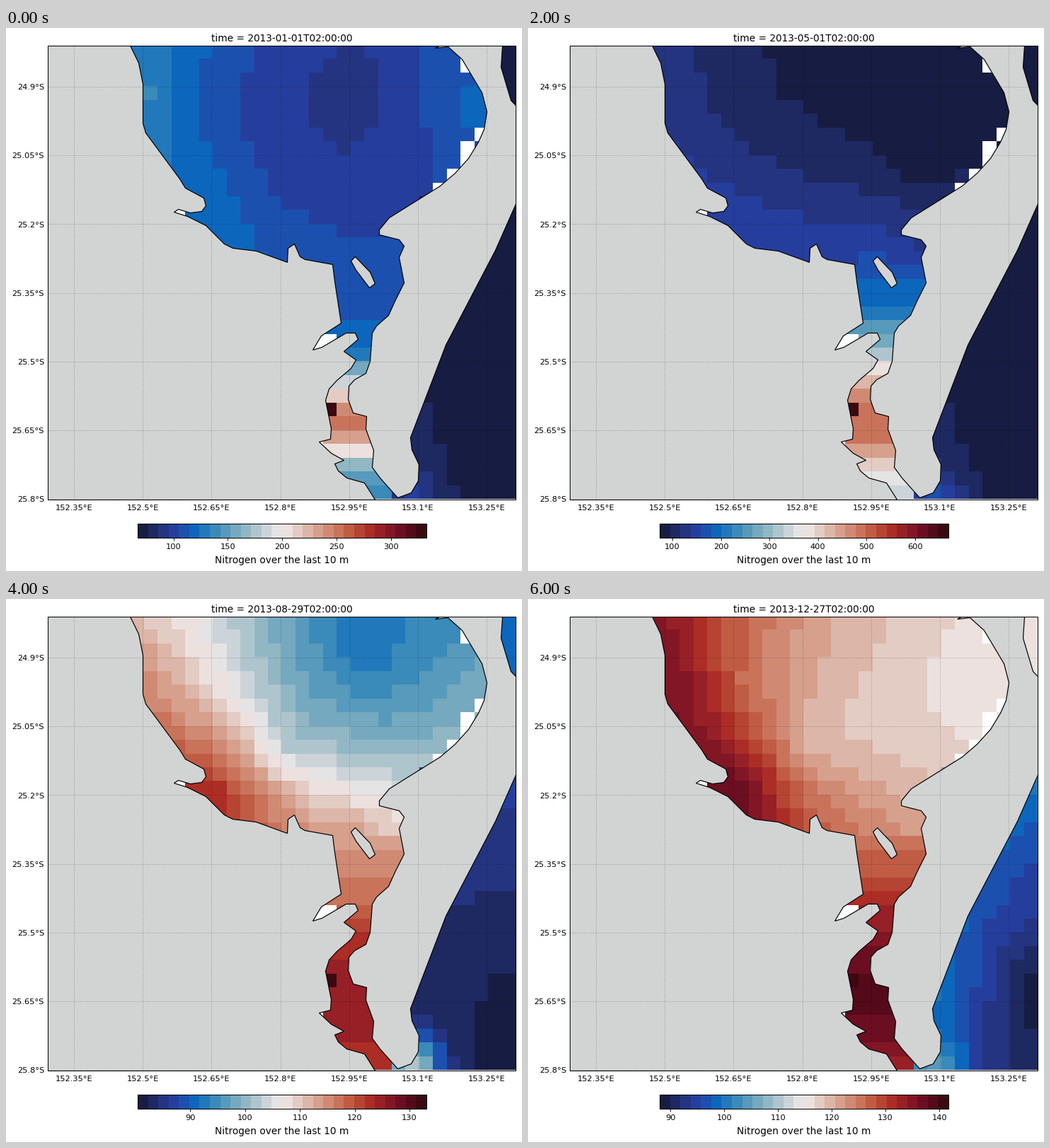
Animation, 729 px wide and 768 px high, one loop 6500 ms. Source, as a matplotlib script:

```python
import numpy as np
import matplotlib.pyplot as plt
from matplotlib.animation import FuncAnimation
from matplotlib.colors import LinearSegmentedColormap

W, H, DPI = 729, 768, 72
LEFT, RIGHT, TOP, BOTTOM = 59, 720, 25, 666.5
ROWS, COLS, BANDS = 33, 34, 28
STEPS, STEP_MS = 13, 500
SMALL, LARGE = 11.38, 13.62
LAND = "#d2d4d3"

plt.rcParams["font.family"] = "DejaVu Sans"

# Diverging blue-white-red scale in a limited number of bands
COLD = "#171c42 #243178 #2642a8 #0c68bd #3386ba #64a1bc #96b9c5 #c8d2d7"
WARM = "#e2c8c0 #d7a390 #cd7e66 #be573f #ae2e26 #8b1927 #650c21 #3c0911"
cmap = LinearSegmentedColormap.from_list(
    "balance", COLD.split() + ["#f1eceb"] + WARM.split(), N=BANDS)
cmap.set_bad("white")

# Corner points of the coasts, in stage pixels
MAINLAND = [
    (40, 10), (168, 10), (187, 49), (193, 79), (193, 134), (197, 148),
    (245, 213), (253, 226), (279, 240), (282, 251), (276, 259), (260, 261),
    (243, 256), (237, 260), (256, 266), (282, 279), (308, 305), (320, 311),
    (353, 315), (397, 331), (398, 311), (407, 305), (415, 323), (422, 327),
    (461, 334), (464, 358), (473, 417), (445, 435), (433, 455), (446, 451),
    (480, 431), (493, 431), (497, 440), (477, 457), (494, 469), (487, 481),
    (467, 498), (456, 510), (451, 526), (459, 566), (458, 581), (442, 585),
    (459, 601), (477, 611), (464, 616), (469, 626), (481, 636), (506, 643),
    (530, 681), (40, 681)]
ISLAND = [
    (702, 10), (640, 10), (606, 28), (624, 26), (644, 44), (672, 91), (679, 118),
    (675, 143), (667, 161), (653, 184), (634, 205), (613, 223), (541, 268),
    (527, 285), (527, 292), (555, 299), (562, 308), (555, 324), (562, 360),
    (549, 386), (540, 406), (523, 421), (517, 431), (514, 471), (508, 488),
    (492, 497), (484, 506), (483, 525), (490, 544), (509, 549), (508, 567),
    (519, 597), (517, 621), (528, 636), (553, 664), (572, 657), (582, 640),
    (583, 617), (573, 596), (571, 579), (621, 448), (691, 314), (740, 203),
    (740, 130), (713, 102), (699, 55)]
ISLET = [(493, 323), (514, 345), (521, 361), (513, 367), (494, 342), (487, 329)]

row, col = np.mgrid[:ROWS, :COLS]
in_strait = row >= 16
in_sea = (((col >= 27) & (row >= 11)) | ((col >= 26) & (row >= 23))
          | ((col >= 25) & (row >= 28)) | ((col >= 32) & (row <= 5)))
no_data = ((col <= 9) & (row >= 11)) | ((col <= 19) & (row >= 20))
for r, c in [(1, 30), (6, 31), (7, 30), (8, 30), (9, 29), (10, 28), (21, 20)]:
    no_data[r, c] = True


def spread(*anchors):
    """Matrix that carries levels at (column, row) anchors to all cells."""
    pts = np.array(anchors, float)
    n = len(pts)
    system = np.ones((n + 1, n + 1))
    system[:n, :n] = np.linalg.norm(pts[:, None] - pts, axis=2)
    system[n, n] = 0
    cells = np.column_stack([col.ravel(), row.ravel()])
    basis = np.ones((len(cells), n + 1))
    basis[:, :n] = np.linalg.norm(cells[:, None] - pts, axis=2)
    return basis @ np.linalg.inv(system)[:, :n]


# Bay: north-west, north, core, east, south-west, middle, south-east, neck
bay_map = spread((7, 3), (12, 4), (22, 2), (30, 4), (12, 12), (17, 9), (25, 9), (22, 15))
# Sea: north, along the coast, offshore, near the cape
sea_map = spread((33, 3), (33, 14), (33, 27), (27, 27))
N_BAY, N_SEA = bay_map.shape[1], sea_map.shape[1]

keys = {}


def key(step, limits, bay, strait, sea, plume):
    """Scale limits, then levels in percent of the scale.

    strait holds the level at its mouth, the peak and the peak's width in rows.
    """
    keys[step] = [*limits, *bay, *strait, *sea, plume]


key(0, (67.1, 332.5), (25, 15, 9, 19, 20, 12.5, 11.5, 15.5), (22, 69, 3.3), (1, 1, 1, 4), 8)
key(3, (63.8, 783), (12, 5, 1, 2, 18, 9, 3, 22), (25, 92, 8), (1, 2, 1, 6), 16)
key(5, (83.8, 555), (8, 4, 1.5, 3, 7.5, 4.5, 2, 8), (22, 48, 3), (1.5, 1, 1, 2), 8)
key(7, (73.7, 437.3), (10, 4.5, 4, 6, 11.5, 7.5, 5.5, 13), (20, 49, 3.2), (2, 1, .5, 7), 5)
key(8, (80.4, 133.1), (63, 50, 22, 33, 80, 42, 36, 61), (68, 85, 7), (21, 10, 2.5, 6), 36)
key(10, (83.3, 144), (48, 38, 31, 36, 84, 53, 42, 62), (40, 81, 6.5), (12, 10, 2, 11), 15)
key(12, (88, 141.7), (89, 71, 57, 51, 91, 59, 55, 66), (68, 94, 8), (53, 18, 1, 21), 14)

key_steps = list(keys)
key_series = np.array(list(keys.values()), float).T
PARTS = np.cumsum([2, N_BAY, 3, N_SEA])


def state(i):
    values = np.array([np.interp(i, key_steps, s) for s in key_series])
    limits, bay_levels, (mouth, peak, width), sea_levels, plume = np.split(values, PARTS)

    bay = (bay_map @ bay_levels).reshape(ROWS, COLS)

    # The strait runs from neck to mouth with a swell around one row
    neck, swell_row = bay_levels[-1], 26.7
    slope = (mouth - neck) / (ROWS - 16)
    swell = peak - neck - slope * (swell_row - 15)
    strait = (neck + slope * (row - 15)
              + swell * np.exp(-((row - swell_row) / width) ** 2))

    sea = (sea_map @ sea_levels).reshape(ROWS, COLS)
    sea = sea + plume * np.exp(-((col - 26) ** 2 + (row - 32) ** 2) / 4)

    level = np.where(in_sea, sea, np.where(in_strait, strait, bay)) / 100
    level[26, 20] = .98
    return *limits, np.ma.array(np.clip(level, 0, 1), mask=no_data)


def pixel_axes(x0, x1, y0, y1):
    ax = fig.add_axes([x0 / W, 1 - y1 / H, (x1 - x0) / W, (y1 - y0) / H])
    ax.set(xlim=(x0, x1), ylim=(y1, y0), xticks=[], yticks=[])
    for spine in ax.spines.values():
        spine.set_linewidth(1)
    return ax


fig = plt.figure(figsize=(W / DPI, H / DPI), dpi=DPI, facecolor="white")
page = pixel_axes(0, W, 0, H)
page.axis("off")
chart = pixel_axes(LEFT, RIGHT, TOP, BOTTOM)
BAR = (186, 594, 701, 721)
bar = pixel_axes(*BAR)

cells = chart.imshow(np.zeros((ROWS, COLS)), cmap=cmap, vmin=0, vmax=1,
                     extent=(LEFT, RIGHT, BOTTOM, TOP), aspect="auto",
                     interpolation="nearest")
for shape in (MAINLAND, ISLAND, ISLET):
    x, y = np.array(shape).T + .5
    chart.fill(x, y, facecolor=LAND, edgecolor="black", lw=1.2, zorder=2)
chart.set(xlim=(LEFT, RIGHT), ylim=(BOTTOM, TOP))

grid = dict(color="black", alpha=.25, lw=.6, ls="--", zorder=3)
for n in range(7):
    x, y = 96 + 97.2 * n, 83 + 97.2 * n
    chart.axvline(x, **grid)
    chart.axhline(y, **grid)
    page.text(x, 682.5, f"{152.35 + .15 * n:.5g}°E", size=SMALL, ha="center")
    page.text(54, y + 4.2, f"{24.9 + .15 * n:.4g}°S", size=SMALL, ha="right")

bar.imshow(np.arange(BANDS)[None], cmap=cmap, extent=(*BAR[:2], *BAR[:1:-1]),
           aspect="auto", interpolation="nearest")
bar.tick_params(axis="x", length=4, width=.9, pad=4, labelsize=SMALL)
title = page.text(390, 19, "", size=LARGE, ha="center")
page.text(390, 757.5, "Nitrogen over the last 10 m", size=LARGE, ha="center")


def draw(i):
    low, high, level = state(i)
    cells.set_data(level)
    span = high - low
    unit = next(s for s in (10, 20, 50, 100, 200) if span / s < 8)
    ticks = np.arange(np.ceil(low / unit) * unit, high, unit)
    x0, x1 = BAR[:2]
    bar.set_xticks(x0 + (x1 - x0) * (ticks - low) / span, [f"{t:.0f}" for t in ticks])
    bar.set_xlim(x0, x1)
    day = np.datetime64("2013-01-01T02:00:00") + np.timedelta64(30 * i, "D")
    title.set_text(f"time = {day}")
    return cells, title


anim = FuncAnimation(fig, draw, frames=STEPS, interval=STEP_MS, repeat=True,
                     init_func=lambda: draw(0), blit=False)
plt.show()
```
